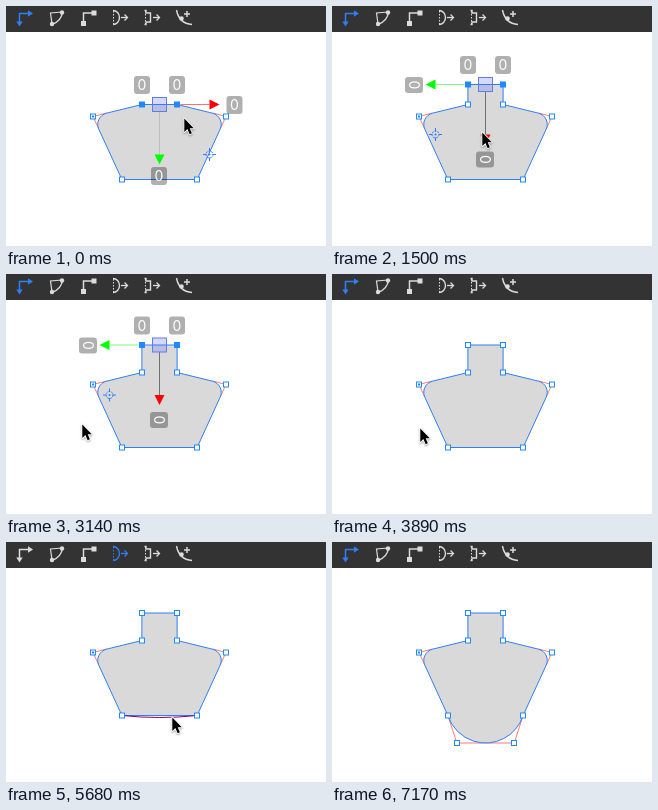
Recreate the animation shown at these times as an HTML page with a canvas. Size 320x240 px, loop 8.22 s.

```html
<!DOCTYPE html>
<html lang="en">
<head>
<meta charset="utf-8">
<title>Shape editing</title>
<style>
html, body { margin: 0; width: 100%; height: 100%; overflow: hidden; background: #fff; }
canvas { display: block; width: 320px; height: 240px; }
</style>
</head>
<body>
<canvas id="stage"></canvas>
<script>
const LOOP = 8220;
const BLUE = '#2f7ef5', RED = '#f00', GREEN = '#0f0', PURPLE = '#800080';
const FILL = '#d9d9d9', HINT = '#ff6b6b';

// Outline geometry, mirrored about MID.
const MID = 153.5, SHOULDER = 98.5, WING = 110.5, BASE = 173.5, FOOT = 201;
const NECK_HALF = 17.6, BASE_HALF = 37.6, WING_HALF = 66.5, FOOT_HALF = 28.7;

const canvas = document.getElementById('stage');
const ctx = canvas.getContext('2d');
const dpr = window.devicePixelRatio || 1;
canvas.width = 320 * dpr;
canvas.height = 240 * dpr;

// Each step changes only the listed properties and holds until the next one.
const steps = [
  [0, { cur: [178, 112], gizmo: 'right', lift: 0, tool: 0, hot: '', sag: 0, done: false }],
  [150, { cur: [165, 110], gizmo: 'left' }],
  [300, { cur: [150, 109] }],
  [600, { cur: [150, 115] }],
  [750, { cur: [150, 128] }],
  [900, { cur: [150, 140] }],
  [1050, { cur: [150, 146] }],
  [1350, { cur: [150, 138], lift: 8 }],
  [1500, { cur: [150, 126], lift: 20 }],
  [1640, { cur: [150, 119], lift: 27.5 }],
  [2090, { cur: [147, 124] }],
  [2240, { cur: [135, 139] }],
  [2390, { cur: [117, 155] }],
  [2540, { cur: [88, 153] }],
  [2690, { cur: [73, 150] }],
  [3140, { cur: [76, 150] }],
  [3440, { cur: [80, 151], gizmo: '' }],
  [3590, { cur: [85, 152] }],
  [3890, { cur: [88, 154] }],
  [4030, { cur: [94, 159] }],
  [4180, { cur: [107, 168] }],
  [4330, { cur: [130, 178], tool: 3, hot: 'base' }],
  [4480, { cur: [158, 182] }],
  [4630, { cur: [179, 182] }],
  [4780, { cur: [187, 179], hot: 'side' }],
  [4930, { cur: [167, 173], hot: 'base' }],
  [5080, { cur: [166, 173] }],
  [5680, { cur: [166, 175], sag: 2, hot: '' }],
  [5830, { cur: [167, 179], sag: 7 }],
  [5980, { cur: [167, 184], sag: 12.5 }],
  [6130, { cur: [168, 189], sag: 18 }],
  [6280, { cur: [169, 194], sag: 23.5 }],
  [6430, { cur: [169, 196], sag: 27.5 }],
  [6580, { done: true }],
  [6730, { cur: [181, 205], tool: 0 }],
  [6880, { cur: [198, 214] }],
  [7030, { cur: [217, 225] }],
  [7170, { cur: null }]
];

function stateAt(t) {
  const s = {};
  for (const [at, change] of steps) if (at <= t) Object.assign(s, change);
  return s;
}

function trace(pts) {
  ctx.beginPath();
  pts.forEach(([x, y], i) => i ? ctx.lineTo(x, y) : ctx.moveTo(x, y));
}

function stroke(color, width = 1) {
  ctx.strokeStyle = color;
  ctx.lineWidth = width;
  ctx.stroke();
}

function line(color, pts, width) {
  trace(pts);
  stroke(color, width);
}

function solid(color, pts) {
  trace(pts);
  ctx.fillStyle = color;
  ctx.fill();
}

function box(color, x, y, size) {
  ctx.fillStyle = color;
  ctx.fillRect(x - size / 2, y - size / 2, size, size);
}

function disc(color, x, y, r) {
  ctx.beginPath();
  ctx.arc(x, y, r, 0, 7);
  ctx.fillStyle = color;
  ctx.fill();
}

function dotted(color, x) {
  ctx.setLineDash([1.5, 1.5]);
  line(color, [[x, 5], [x, 19]], 1);
  ctx.setLineDash([]);
}

function pullArrow(color, x) {
  line(color, [[x, 11.5], [x + 6, 11.5]], 1.3);
  line(color, [[x + 3.5, 8.5], [x + 6.5, 11.5], [x + 3.5, 14.5]], 1.3);
}

const icons = [
  c => {
    line(c, [[22, 7.5], [13.5, 7.5], [13.5, 16]], 1.5);
    solid(c, [[22, 4.3], [27, 7.5], [22, 10.7]]);
    solid(c, [[10.3, 15.5], [16.7, 15.5], [13.5, 20.5]]);
  },
  c => {
    line(c, [[46, 18], [44.5, 7], [56, 6]], 1.2);
    ctx.beginPath();
    ctx.moveTo(56.5, 6);
    ctx.quadraticCurveTo(55.5, 15, 46, 18.5);
    stroke(c, 1.4);
    disc(c, 46, 18, 2.2);
    disc(c, 56, 6.5, 2.2);
  },
  c => {
    line(c, [[77.5, 18], [77.5, 7], [88, 7]], 1.5);
    box(c, 77.5, 17.5, 5);
    box(c, 88, 7, 5);
  },
  c => {
    dotted(c, 107.5);
    ctx.beginPath();
    ctx.ellipse(107, 11.5, 6.5, 7, 0, -Math.PI / 2, Math.PI / 2);
    stroke(c, 1.4);
    pullArrow(c, 115);
  },
  c => {
    dotted(c, 139.5);
    line(c, [[138.5, 4.5], [140, 4.5], [140, 7], [144.5, 7], [144.5, 16], [140, 16], [140, 18.5], [138.5, 18.5]], 1.4);
    pullArrow(c, 147);
  },
  c => {
    ctx.beginPath();
    ctx.moveTo(170.5, 4);
    ctx.quadraticCurveTo(173, 17.5, 186, 18.5);
    stroke(c, 1.4);
    disc(c, 175.5, 12.5, 2.3);
    line(c, [[178, 8], [184, 8]], 1.5);
    line(c, [[181, 5], [181, 11]], 1.5);
  }
];

function toolbar(active) {
  ctx.fillStyle = '#333';
  ctx.fillRect(0, 0, 320, 26);
  icons.forEach((draw, i) => draw(i === active ? BLUE : '#dcdcdc'));
}

// Bulge below the base edge, drawn from right to left.
function bulge(sag) {
  const r = (BASE_HALF ** 2 + sag * sag) / (2 * sag);
  const cy = BASE + sag - r;
  const a = Math.atan2(BASE - cy, BASE_HALF);
  ctx.arc(MID, cy, r, a, Math.PI - a);
}

function shape(s) {
  const top = SHOULDER - s.lift;
  for (const d of [-1, 1])
    line(HINT, [[MID + d * 53, 107], [MID + d * WING_HALF, WING], [MID + d * 60.7, 123]], 0.9);
  if (s.done)
    line(HINT, [
      [MID - BASE_HALF, BASE], [MID - FOOT_HALF, FOOT],
      [MID + FOOT_HALF, FOOT], [MID + BASE_HALF, BASE]
    ], 0.9);

  ctx.beginPath();
  ctx.moveTo(MID - NECK_HALF, top);
  ctx.lineTo(MID + NECK_HALF, top);
  ctx.lineTo(MID + NECK_HALF, SHOULDER);
  ctx.arcTo(MID + WING_HALF, WING, MID + BASE_HALF, BASE, 11.5);
  ctx.lineTo(MID + BASE_HALF, BASE);
  if (s.done) bulge(s.sag);
  ctx.lineTo(MID - BASE_HALF, BASE);
  ctx.arcTo(MID - WING_HALF, WING, MID - NECK_HALF, SHOULDER, 11.5);
  ctx.lineTo(MID - NECK_HALF, SHOULDER);
  ctx.closePath();
  ctx.fillStyle = FILL;
  ctx.fill();
  stroke(BLUE);

  if (s.hot === 'side') line(PURPLE, [[MID + BASE_HALF, BASE], [MID + WING_HALF, WING]]);
  if (s.hot === 'base') line(PURPLE, [[MID + BASE_HALF, BASE], [MID - BASE_HALF, BASE]]);
  if (s.sag && !s.done) {
    ctx.beginPath();
    bulge(s.sag);
    stroke(PURPLE);
  }
}

function point(x, y, on) {
  x = Math.round(x);
  box('#2089ff', x, y, 6);
  if (!on) box('#fff', x, y, 4);
}

function points(s) {
  const top = SHOULDER - s.lift;
  for (const d of [-1, 1]) {
    point(MID + d * WING_HALF, WING);
    point(MID + d * BASE_HALF, BASE);
    if (s.lift) point(MID + d * NECK_HALF, SHOULDER);
    if (s.done) point(MID + d * FOOT_HALF, FOOT);
  }
  box('#2089ff', MID - WING_HALF, WING, 2);
  point(MID - NECK_HALF, top, s.gizmo);
  point(MID + NECK_HALF, top, s.gizmo === 'right' || (s.gizmo && s.lift));
}

function label(x, y, turned) {
  ctx.save();
  ctx.translate(x, y);
  if (turned) ctx.rotate(Math.PI / 2);
  ctx.fillStyle = 'rgba(0,0,0,.31)';
  ctx.beginPath();
  ctx.roundRect(-8, -9, 16, 18, 3);
  ctx.fill();
  ctx.fillStyle = '#fff';
  ctx.fillText('0', 0, 5);
  ctx.restore();
}

function pivot(x, y) {
  ctx.beginPath();
  ctx.arc(x, y, 3.5, 0, 7);
  ctx.setLineDash([2, 1]);
  stroke(BLUE);
  ctx.setLineDash([]);
  for (const [dx, dy] of [[1, 0], [-1, 0], [0, 1], [0, -1]])
    line(BLUE, [[x + dx * 3, y + dy * 3], [x + dx * 6.5, y + dy * 6.5]]);
  disc(BLUE, x, y, 1);
}

function gizmo(s) {
  const x = MID, y = SHOULDER - s.lift;
  const left = s.gizmo === 'left', d = left ? -1 : 1;
  line(left ? '#7dff7d' : '#ff7070', [[x + d * 21, y], [x + d * 50, y]]);
  solid(left ? GREEN : RED, [[x + d * 50, y - 5], [x + d * 60, y], [x + d * 50, y + 5]]);
  line(left ? '#707070' : '#bdbdbd', [[x, y + 7], [x, y + 51]]);
  solid(left ? RED : GREEN, [[x - 5, y + 50], [x + 5, y + 50], [x, y + 60]]);
  box('rgba(90,100,255,.25)', x, y, 14);
  ctx.strokeStyle = '#5f7de8';
  ctx.lineWidth = 1;
  ctx.strokeRect(x - 7, y - 7, 14, 14);
  pivot(x + d * 50, y + 50);
  label(136, y - 19.5);
  label(171, y - 19.5);
  label(left ? 82 : 228.5, y + 0.5, left);
  label(153, y + (left ? 75 : 71.5), left);
}

function cursor(x, y) {
  ctx.save();
  ctx.translate(x + 0.3, y + 0.5);
  ctx.scale(0.86, 0.9);
  trace([[0, 0], [0, 15], [3.6, 11.8], [6.2, 17.5], [8.8, 16.4], [6.3, 10.9], [11, 10.9]]);
  ctx.closePath();
  ctx.lineJoin = 'round';
  ctx.shadowColor = 'rgba(0,0,0,.35)';
  ctx.shadowBlur = 2 * dpr;
  ctx.shadowOffsetY = dpr;
  stroke('#fff', 2);
  ctx.shadowColor = 'transparent';
  ctx.fillStyle = '#000';
  ctx.fill();
  ctx.restore();
}

function draw(t) {
  const s = stateAt(t);
  ctx.setTransform(dpr, 0, 0, dpr, 0, 0);
  ctx.fillStyle = '#fff';
  ctx.fillRect(0, 0, 320, 240);
  ctx.font = '14px Inter, Roboto, sans-serif';
  ctx.textAlign = 'center';
  toolbar(s.tool);
  shape(s);
  points(s);
  if (s.gizmo) gizmo(s);
  if (s.cur) cursor(...s.cur);
}

const start = performance.now();
function tick() {
  draw((performance.now() - start) % LOOP);
  requestAnimationFrame(tick);
}
tick();
</script>
</body>
</html>
```
